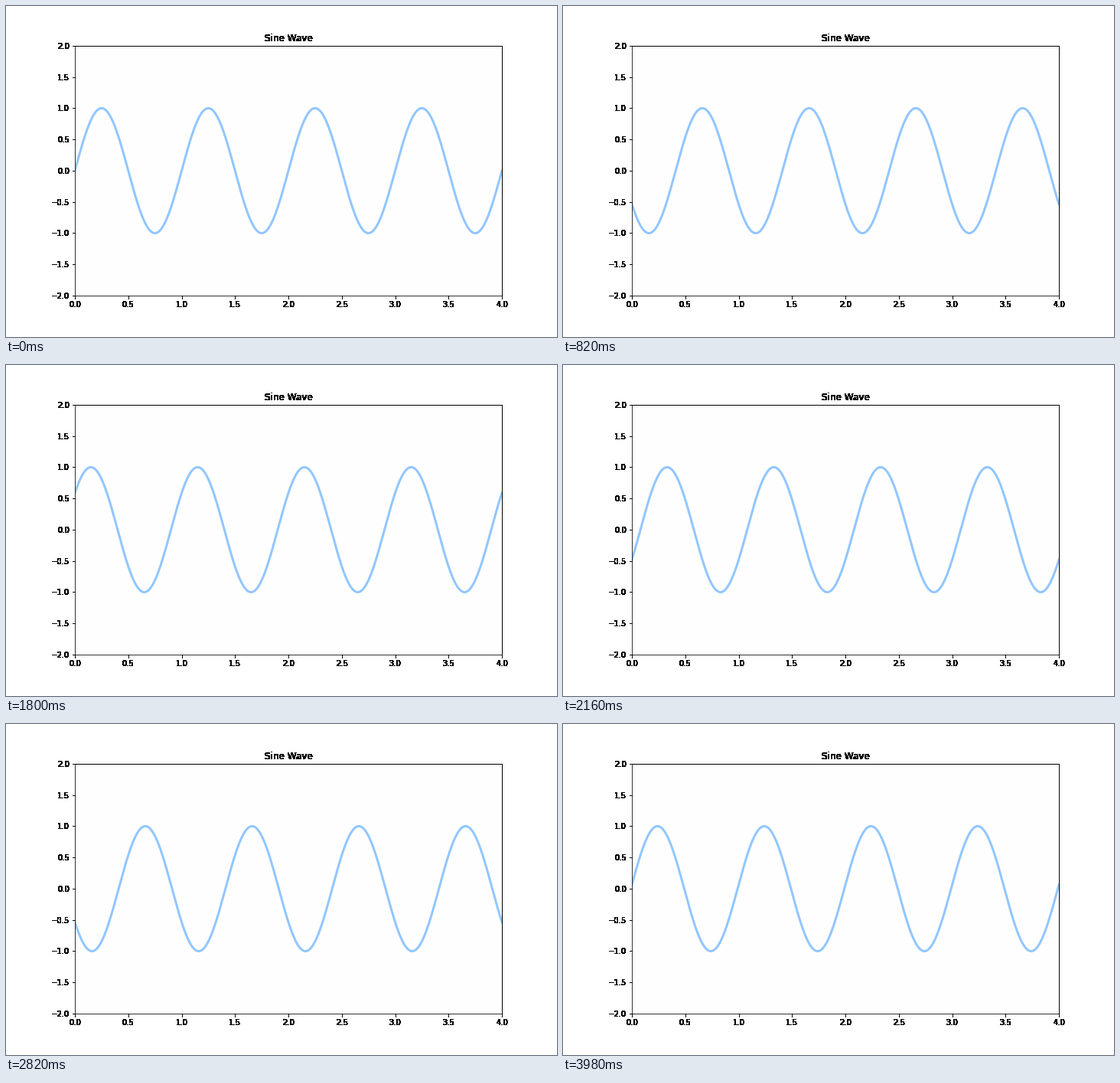
These frames come from a looping animation (720 by 432 pixels, 4 s). A matplotlib script:

```python
import matplotlib.pyplot as plt
import numpy as np
from matplotlib.animation import FuncAnimation

FRAMES = 200
STEP = 0.01  # phase shift per frame, in periods

plt.rcParams.update({"font.family": "DejaVu Sans", "font.size": 10})


def harden(image, dpi):
    """Turn every touched pixel solid black, giving crisp, heavy text."""
    solid = np.zeros_like(image)
    solid[..., 3] = image[..., 3] > 0
    return solid, 0, 0


fig, ax = plt.subplots(figsize=(10, 6), dpi=72, facecolor="white")
fig.subplots_adjust(left=0.125, right=0.9, bottom=0.125, top=0.88)
ax.set_facecolor("#fefefe")
ax.set(xlim=(0, 4), ylim=(-2, 2),
       xticks=np.arange(0, 4.1, 0.5), yticks=np.arange(-2, 2.1, 0.5))
title = ax.set_title("Sine Wave", fontsize=12)

for artist in (ax.xaxis, ax.yaxis, title):
    artist.set_agg_filter(harden)
for side in ("top", "right"):
    ax.spines[side].set_linewidth(1)

x = np.linspace(0, 4, 1000)
line, = ax.plot([], [], color="#92c6ff", lw=3)


def update(i):
    line.set_data(x, np.sin(2 * np.pi * (x - STEP * i)))
    return line,


anim = FuncAnimation(fig, update, frames=FRAMES, interval=20,
                     repeat=True, repeat_delay=0)
plt.show()
```
